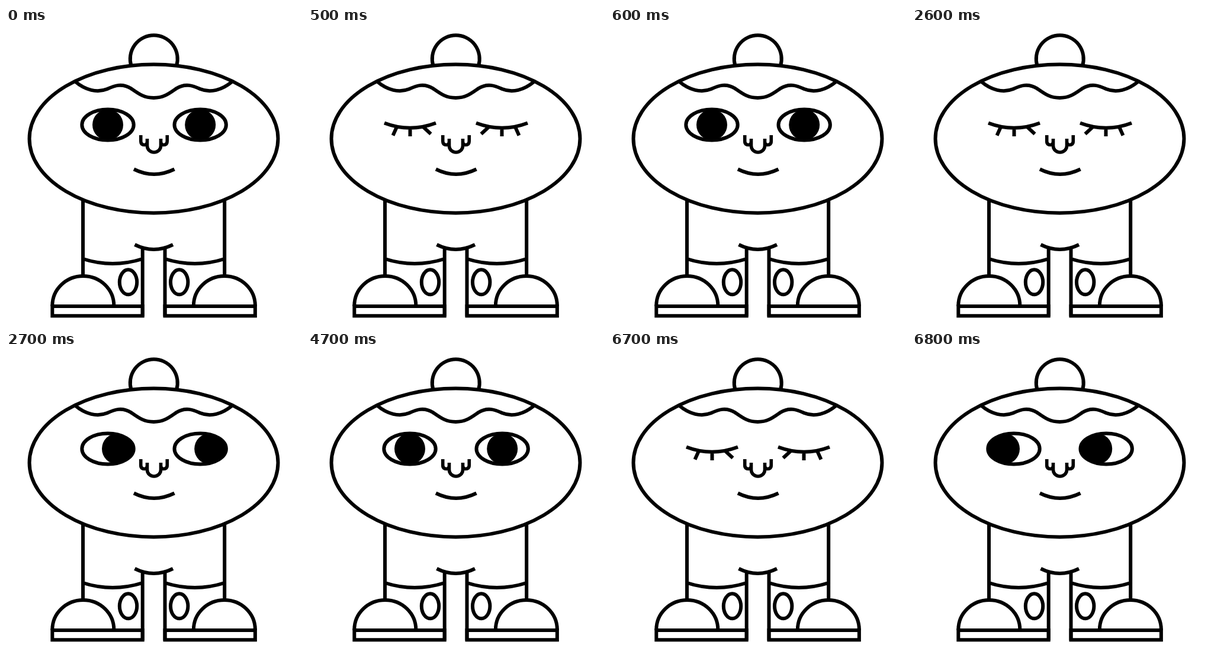
Recreate the animation shown at these times as an HTML page. Size 500 by 500 pixels, loop 8000 ms.

```html
<!DOCTYPE html>
<html lang="en">
<head>
<meta charset="utf-8">
<title>Blinking character</title>
<style>
  html, body { margin: 0; width: 100%; height: 100%; overflow: hidden; background: #fff; }
  svg { display: block; width: 100%; height: 100%; }
  .line { fill: none; stroke: #000; stroke-width: 6; }
  .open, .closed, .pupils { animation: 8s step-end infinite; }
  .open { animation-name: open; }
  .closed { animation-name: closed; }
  .pupils { animation-name: gaze; }

  /* Blinks last 100 ms, at 0.5 s, 2.6 s and 6.7 s */
  @keyframes open {
    0%, 7.5%, 33.75%, 85% { visibility: visible; }
    6.25%, 32.5%, 83.75% { visibility: hidden; }
  }
  @keyframes closed {
    0%, 7.5%, 33.75%, 85% { visibility: hidden; }
    6.25%, 32.5%, 83.75% { visibility: visible; }
  }
  @keyframes gaze {
    0%, 58.75% { transform: translateX(0); }
    33.75% { transform: translateX(16px); }
    85% { transform: translateX(-16px); }
  }
</style>
</head>
<body>
<svg viewBox="0 0 500 500">
  <defs>
    <clipPath id="eyeClip">
      <ellipse cx="172" cy="163.5" rx="44" ry="26"/>
      <ellipse cx="328.2" cy="163.5" rx="44" ry="26"/>
    </clipPath>
    <path id="lid" class="line" d="M129 160.5Q172 177 216 160.5M150 167L143.500 181.500M172.500 168V183M194.500 167L207.500 179"/>
    <g id="leg" class="line">
      <path d="M130 290V419M230.700 372V487M130 390Q180 406 230.700 390"/>
      <ellipse cx="206.500" cy="429.300" rx="14.700" ry="21"/>
      <path d="M78.300 470V469A52 50 0 0 1 182.300 469V470"/>
      <path d="M78.300 470H230.700V486.300H78.300Z"/>
    </g>
  </defs>

  <g class="line">
    <path d="M211.500 64A40 40 0 1 1 288 64"/>
    <ellipse cx="249.500" cy="187" rx="210" ry="125.500"/>
    <path d="M117 90.500C134 105 154 110 171 103C184 97 196 93 211 102C224 111 233 118 249.500 118C266 118 275 111 288 102C303 93 315 97 328 103C345 110 365 105 382 90.500"/>
    <path d="M217.500 366Q249.500 382 282 366"/>
    <path d="M216 238.500Q250 255.500 284.500 238.500"/>
    <path stroke-width="5.6" d="M227.700 181V191Q227.700 197.500 234 197.500Q238.500 197.500 238.500 192M238.500 187V199A11.500 11 0 0 0 261.500 199V187M261.500 192Q261.500 197.500 266 197.500Q272.300 197.500 272.300 191V181"/>
  </g>
  <use href="#leg"/>
  <use href="#leg" transform="matrix(-1 0 0 1 499.2 0)"/>

  <g class="open">
    <g clip-path="url(#eyeClip)">
      <g class="pupils">
        <circle cx="172" cy="163.500" r="26"/>
        <circle cx="328.200" cy="163.500" r="26"/>
      </g>
    </g>
    <ellipse class="line" cx="172" cy="163.500" rx="43.700" ry="26"/>
    <ellipse class="line" cx="328.200" cy="163.500" rx="43.700" ry="26"/>
  </g>
  <g class="closed">
    <use href="#lid"/>
    <use href="#lid" transform="matrix(-1 0 0 1 500 0)"/>
  </g>
</svg>
</body>
</html>
```
